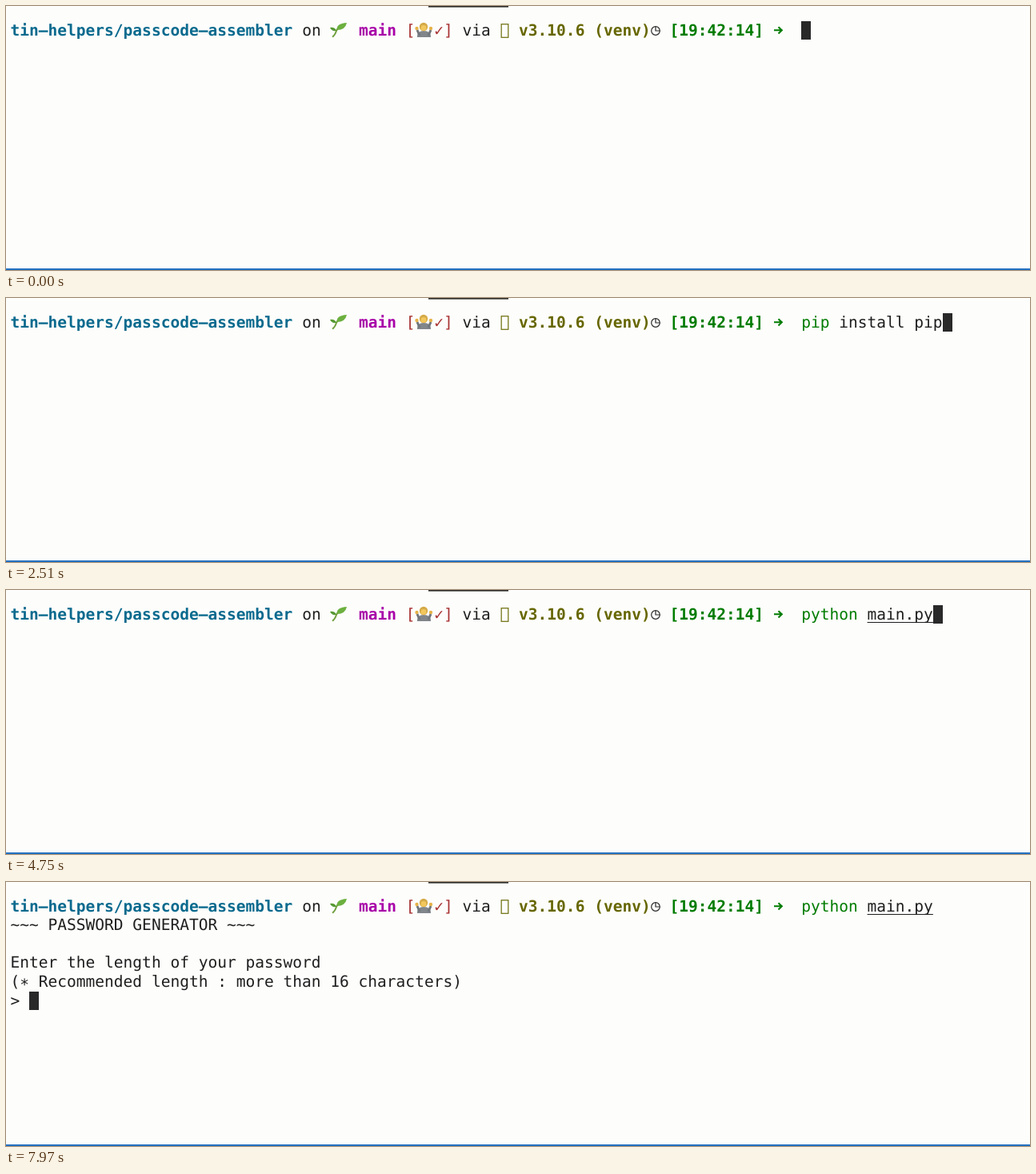
Write an HTML page that moves like this. It is 1280 px wide and 330 px high and loops after 8 s.

```html
<!DOCTYPE html>
<html lang="en">
<head>
<meta charset="utf-8">
<title>Terminal session</title>
<style>
  html, body { margin: 0; width: 100%; height: 100%; overflow: hidden; background: #fdfdfb; }
  #stage {
    position: relative; width: 1280px; height: 330px; overflow: hidden;
    background: #fdfdfb; color: #1f1f1f;
    font: 19.55px/23.6px "DejaVu Sans Mono", monospace;
    text-rendering: geometricPrecision; font-variant-ligatures: none;
  }
  #stage span, #cursor, svg { position: absolute; white-space: pre; }
  svg { left: 0; top: 0; }
  .bold { font-weight: bold; }
  .path { color: #0a6a8e; }
  .branch { color: #a800a8; }
  .red { color: #a83232; }
  .olive { color: #666600; }
  .green { color: #007c00; }
  .file {
    text-decoration: underline 1px; text-underline-offset: 2.5px;
    text-decoration-skip-ink: none;
  }
  #cursor { width: 11.8px; height: 23.2px; background: #292929; }
</style>
</head>
<body>
<div id="stage">
  <svg width="1280" height="330" fill="none">
    <rect x="528" y="0" width="100" height="1.6" fill="#2a2a26"/>
    <rect x="0" y="328" width="1280" height="2" fill="#2470c0"/>
    <!-- seedling -->
    <path d="M408 38.5Q411 37 413 31Q414 28 418 26" stroke="#6f9f3c" stroke-width="2"/>
    <path d="M414 30Q412 22 426 21Q424 30 414 30Z" fill="#6cb03f"/>
    <path d="M413 31Q411 26 405 27Q407 32 413 31Z" fill="#579a35"/>
    <!-- shrugging figure -->
    <path d="M514 39Q514 31 522 31Q531 31 531 39Z" fill="#81868b"/>
    <path d="M514 30L517 37M531 30L528 37" stroke="#70767c" stroke-width="3"/>
    <circle cx="522" cy="26" r="5.2" fill="#d5aa48"/>
    <circle cx="522" cy="27.5" r="3.4" fill="#f2c75c"/>
    <circle cx="513.5" cy="28" r="2.2" fill="#e5b34b"/>
    <circle cx="531" cy="28" r="2.2" fill="#e5b34b"/>
    <!-- empty glyph box, clock, arrow -->
    <rect x="619.2" y="22.7" width="8.6" height="16.6" stroke="#77771c" stroke-width="1.3"/>
    <g stroke="#2a2a2a" stroke-width="1.2">
      <circle cx="812" cy="31" r="5.3"/>
      <path d="M812 25.7V31H817.3"/>
    </g>
    <path d="M960 30.3H969M965.5 26.2L969.8 30.3L965.5 34.4" stroke="#007c00" stroke-width="2.1"/>
  </svg>
  <div id="cursor"></div>
</div>
<script>
const LOOP = 8000, LEFT = 5.5, TOP = 18.6, CELL = 11.77, ROW = 23.6;
const FIRST = "pip install pip", SECOND = "python main.py";
const PROMPT = 84, ENTER = 6710, OUTPUT = 7130;

const stage = document.getElementById("stage");
const cursor = document.getElementById("cursor");

function place(el, col, row) {
  el.style.left = LEFT + col * CELL + "px";
  el.style.top = TOP + row * ROW + "px";
}

function write(text, col, row, style = "") {
  const span = document.createElement("span");
  span.textContent = text;
  span.className = style;
  place(span, col, row);
  stage.appendChild(span);
  return span;
}

write("tin–helpers/passcode–assembler", 0, 0, "path bold");
write("on", 31, 0);
write("main", 37, 0, "branch bold");
write("[", 42, 0, "red");
write("✓", 45, 0, "red");
write("]", 46, 0, "red");
write("via", 48, 0);
write("v3.10.6", 54, 0, "olive bold");
write("(venv)", 62, 0, "olive bold");
write("[19:42:14]", 70, 0, "green bold");

const word = write("", PROMPT, 0);
const rest = write("", PROMPT, 0);
const output = [
  write("~~~ PASSWORD GENERATOR ~~~", 0, 1),
  write("Enter the length of your password", 0, 3),
  write("(∗ Recommended length : more than 16 characters)", 0, 4),
  write(">", 0, 5)
];

// Screen updates come in triples: two short ones, then a long one.
function tick(t) {
  const s = t - 2470, group = Math.floor(s / 140), r = s - group * 140;
  return group * 3 + Math.min(2, Math.floor(r / 20));
}

function commandAt(t) {
  if (t < 20) return "";
  const n = tick(t);
  if (n < 9) return FIRST.slice(0, Math.floor((t - 20) / 56.4) + 1);
  if (n < 23) return FIRST.slice(0, 23 - n);
  return SECOND.slice(0, n - 21);
}

function draw(t) {
  const text = commandAt(t);
  const name = text.split(" ")[0];
  const known = name === "pip" || name === "python";
  word.textContent = name;
  word.className = known ? "green" : "red bold";
  rest.textContent = text.slice(name.length + 1);
  rest.className = name === "python" ? "file" : "";
  place(rest, PROMPT + name.length + 1, 0);

  const done = t >= OUTPUT;
  for (const line of output) line.style.display = done ? "" : "none";
  if (done) place(cursor, 2, 5);
  else if (t >= ENTER) place(cursor, 0, 1);
  else place(cursor, PROMPT + text.length, 0);
}

function frame() {
  draw(performance.now() % LOOP);
  requestAnimationFrame(frame);
}
draw(0);
requestAnimationFrame(frame);
</script>
</body>
</html>
```
